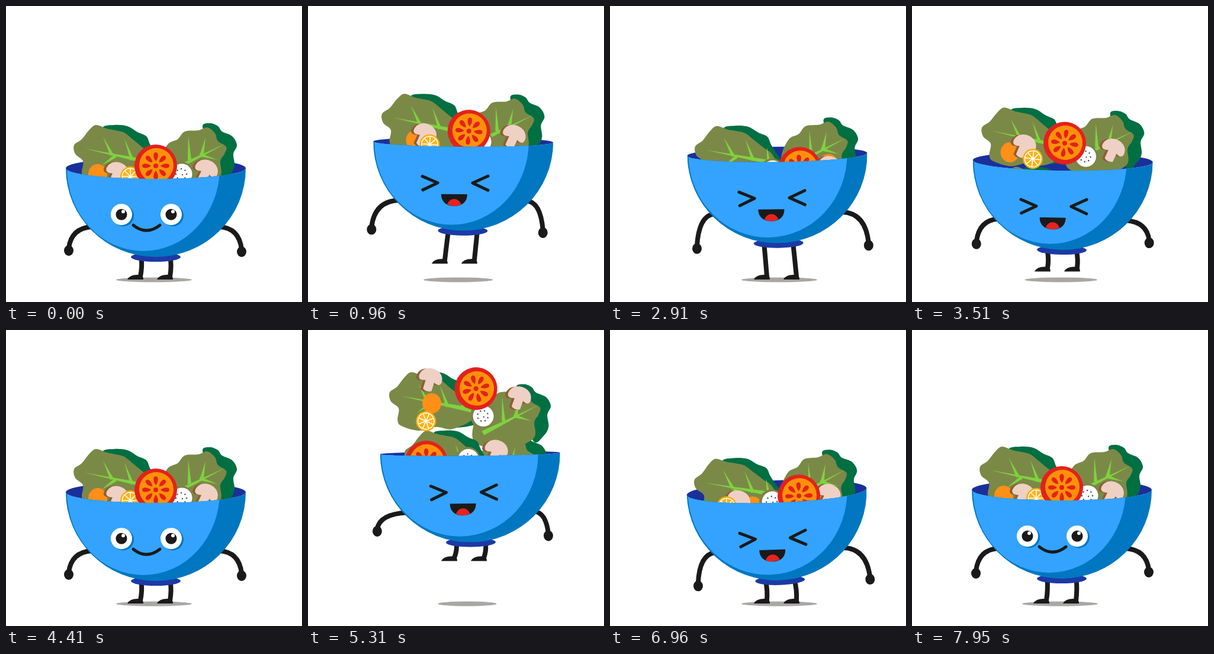
These frames come from a looping animation (500 px wide and 500 px high, 8 s). An HTML page:

```html
<!DOCTYPE html>
<html lang="en">
<head>
<meta charset="utf-8">
<title>Jumping salad bowl</title>
<style>
  html, body { margin: 0; width: 100%; height: 100%; overflow: hidden; background: #fff; }
  svg { display: block; width: 100%; height: 100%; }
  .limb { fill: none; stroke: #1a1a1a; stroke-width: 8; stroke-linecap: round; }
  .ink { fill: #1a1a1a; }
  .line { fill: none; stroke: #1a1a1a; stroke-width: 5; stroke-linecap: round; stroke-linejoin: round; }
</style>
</head>
<body>
<svg viewBox="0 0 500 500">
  <defs>
    <clipPath id="opening"><path id="openingPath"/></clipPath>
    <clipPath id="shell"><path id="shellPath"/></clipPath>
  </defs>
  <ellipse id="shadow" cy="462.5" ry="4" fill="#aaa7a3"/>
  <path id="legs" class="limb"/>
  <path id="feet" class="ink"/>
  <g id="body">
    <path id="arms" class="limb"/>
    <ellipse id="handL" class="ink" rx="8" ry="9"/>
    <ellipse id="handR" class="ink" rx="8" ry="9"/>
    <ellipse cy="150" rx="42" ry="8" fill="#1c3aa6"/>
    <ellipse id="rim" rx="152" fill="#1b2f9b"/>
    <g clip-path="url(#opening)"><g id="food"></g></g>
    <g clip-path="url(#shell)">
      <rect x="-155" y="-5" width="310" height="160" fill="#0077c0"/>
      <ellipse id="light" ry="140" fill="#33a3ff"/>
    </g>
    <g id="face">
      <g id="smile">
        <g id="eyes"></g>
        <path class="line" d="M-22 18Q0 36 23 18"/>
      </g>
      <g id="laugh">
        <path class="line" d="M-54 -11L-28 0L-53 12M57 -12L31 0L57 12"/>
        <path class="ink" d="M-22 19H22C22 33 12 39 0 39S-22 33 -22 19Z"/>
        <path fill="#e8221f" d="M-12 36Q-8 27 0 27T12 36Q0 42 -12 36Z"/>
      </g>
    </g>
  </g>
</svg>
<script>
const LOOP = 8000, CYCLE = 4100, HALF = CYCLE / 2;
const $ = id => document.getElementById(id);
const set = (id, attrs) => { for (const a in attrs) $(id).setAttribute(a, attrs[a]); };
const mix = (a, b, k) => a + (b - a) * k;
const clamp = v => Math.max(0, Math.min(1, v));

// Smooth curve through [time, value] keys.
function track(...keys) {
  const slope = i => i > 0 && i < keys.length - 1
    ? (keys[i + 1][1] - keys[i - 1][1]) / (keys[i + 1][0] - keys[i - 1][0]) : 0;
  return t => {
    if (t <= keys[0][0]) return keys[0][1];
    const i = keys.findIndex(k => k[0] > t) - 1;
    if (i < 0) return keys[keys.length - 1][1];
    const [t0, a] = keys[i], [t1, b] = keys[i + 1], d = t1 - t0, u = (t - t0) / d;
    return mix(a, b, u * u * (3 - 2 * u))
      + d * u * (1 - u) * ((1 - u) * slope(i) - u * slope(i + 1));
  };
}

// One jump, including the rest before it and the landing after it.
const rimY = track([0, 274], [155, 276], [310, 274], [560, 275], [720, 283], [810, 273], [860, 251],
  [920, 239], [1000, 222], [1120, 210], [1210, 208.5], [1320, 221], [1450, 259], [1540, 281],
  [1600, 278], [1800, 270], [2050, 274]);
const rimDepth = track([0, 18], [310, 18], [720, 21], [810, 19], [860, 13], [1000, 7], [1210, 4],
  [1400, 11], [1540, 23], [1590, 22], [1800, 18], [2050, 18]);
const travel = track([780, 0], [860, .09], [1210, .63], [1315, .81], [1460, 1]);
const lean = track([500, 0], [810, 2.2], [860, .9], [1210, -.5], [1590, -.6], [1800, 0]);
const toss = track([810, 0], [860, -.14], [930, .06], [1210, 1], [1270, 1.15], [1450, .3],
  [1540, -.03], [1640, 0]);
const trailX = track([400, 147], [780, 152], [860, 152], [1210, 158], [1500, 147]);
const trailY = track([400, 139], [780, 152], [860, 156], [1210, 130], [1600, 141], [1800, 139]);
const leadX = track([400, 145], [780, 139], [860, 138], [1210, 131], [1500, 145]);
const leadY = track([400, 141], [780, 152], [860, 157], [1210, 140], [1600, 143], [1800, 141]);
const hover = track([1430, 0], [1560, 1], [1600, 1], [1760, 0]);

// Closed smooth outline from a flat list of coordinates.
function blob(fill, ...c) {
  const n = c.length / 2, at = i => { i = (i + n) % n; return [c[2 * i], c[2 * i + 1]]; };
  let d = "M" + at(0);
  for (let i = 0; i < n; i++) {
    const [a, b, e, f] = [at(i - 1), at(i), at(i + 1), at(i + 2)];
    d += "C" + [0, 1].map(j => b[j] + (e[j] - a[j]) / 6) + " "
      + [0, 1].map(j => e[j] - (f[j] - b[j]) / 6) + " " + e;
  }
  return `<path fill="${fill}" d="${d}Z"/>`;
}
const vein = (x, y, bx, by, w) => {
  const l = Math.hypot(bx - x, by - y), nx = (y - by) / l * w, ny = (bx - x) / l * w;
  return `<path fill="#7fd23f" d="M${x} ${y}L${bx + nx} ${by + ny}L${bx - nx} ${by - ny}Z"/>`;
};
const disc = (r, fill, x = 0, y = 0) => `<circle cx="${x}" cy="${y}" r="${r}" fill="${fill}"/>`;
const ring = (n, draw) => Array.from({ length: n }, (_, i) => draw(i * 360 / n)).join("");

const OLIVE = "#7b8947", DARK = "#006f42";
const leafLeft =
  blob(DARK, -90, -68, -70, -73, -48, -71, -31, -61, -16, -54, -10, -41, -3, -29, 9, -9, 7, 16, -50, 16, -80, -40) +
  blob(OLIVE, -125, 8, -123, -12, -136, -24, -138, -39, -125, -49, -113, -64, -101, -73, -83, -67, -68, -64,
    -53, -60, -38, -48, -21, -34, -8, -24, 2, 0, -4, 12, -34, 24, -60, 20, -89, 26, -118, 18) +
  vein(-120, -33, 0, -8, 4) + vein(-89, -53, -74, -22, 3) + vein(-53, -50, -40, -14, 3) +
  vein(-17, -36, -14, -10, 3) + vein(-92, -4, -68, -21, 3);
const leafRight =
  blob(DARK, 79, -71, 92, -76, 105, -71, 112, -62, 129, -54, 137, -39, 131, -24, 133, -4, 125, 11, 107, 20, 90, -40) +
  blob(OLIVE, 9, 22, 7, -12, 20, -40, 37, -49, 49, -62, 72, -64, 87, -69, 100, -59, 105, -46, 119, -36,
    116, -24, 109, -12, 107, 16, 60, 34) +
  vein(117, -41, 22, 6, 4) + vein(55, -55, 57, -14, 3) + vein(84, -52, 78, -24, 3) + vein(104, -14, 74, -23, 3);
const tomato = disc(36, "#e3211c") + disc(29, "#ff9108", 1, -1) +
  ring(8, a => `<path fill="#e3211c" transform="rotate(${a})" d="M0 -8C5 -14 5 -23 0 -23S-5 -14 0 -8Z"/>`) +
  disc(4, "#e3211c");
const lemon = disc(17, "#ffab0a") + disc(14.5, "#fff") + disc(13, "#ffb31a") +
  ring(8, a => `<path stroke="#fff" stroke-width="1.6" transform="rotate(${a})" d="M0 0V-13"/>`);
const cucumber = disc(21, "#7f8148") + disc(17.5, "#fff", 1, 0) +
  ring(8, a => `<circle cy="-9" r="1.3" fill="#555" transform="rotate(${a})"/>`) + disc(1.2, "#555", 2, 1);
const carrot = `<ellipse rx="16" ry="17" fill="#ff8f17"/>`;
const capPath = "M-20 0C-20 -24 20 -24 20 0Q19 9 8 4V19Q0 24 -7 19V4Q-19 9 -20 0Z";
const mushroom = `<path fill="#8d5f35" d="${capPath}" transform="translate(-4 2)"/><path fill="#efd0c5" d="${capPath}"/>`;

// Place in the bowl at the left stop, in the air, and at the right stop; then turn at rest and in the air.
const food = [
  [leafLeft, [0, 0], [3, -65], [0, 14]],
  [leafRight, [0, 100], [-8, 42], [0, 100]],
  [leafRight, [0, 0], [0, -40], [0, 9]],
  [leafLeft, [20, 100], [28, 34], [20, 100]],
  [carrot, [-98, 10], [-64, -85], [-40, 24]],
  [carrot, [60, 45], [70, 25], [87, 16]],
  [mushroom, [-65, 8], [-66, -126], [-65, 14], 25, 18],
  [mushroom, [85, 4], [84, -94], [88, 9], 25, 20, 45],
  [mushroom, [30, 60], [44, -4], [30, 60], 10, 20],
  [lemon, [-43, 14], [-74, -55], [-86, 22], 0, 25],
  [cucumber, [43, 10], [22, -63], [-10, 17], 0, 20],
  [cucumber, [0, 60], [-4, 10], [0, 60]],
  [tomato, [-60, 70], [-74, 14], [-60, 70]],
  [tomato, [0, -4], [11, -109], [38, 9], 0, 30]
];
$("food").innerHTML = food.map(f => `<g>${f[0]}</g>`).join("");
$("eyes").innerHTML = [-42, 42].map(x => `<g transform="translate(${x} 0)">
  <ellipse cx="3" cy="2" rx="18" ry="18" fill="#0077c0"/><ellipse rx="18" ry="18" fill="#fff"/>
  ${disc(9.5, "#1a1a1a")}${disc(3, "#fff", 3, -5)}</g>`).join("");

function render(now) {
  const phase = now % LOOP % CYCLE, right = phase < HALF, t = phase % HALF;
  const along = v => right ? v : 1 - v;
  const y = rimY(t), depth = rimDepth(t), p = along(travel(t)), fly = toss(t);
  const baseX = mix(253, 288, p), baseY = y + 151;
  const u = clamp((t - 900) / 590), lift = 288 * u * (1 - u);
  const ankleX = mix(250, 288, along(u)), ground = 462 - lift;

  set("shadow", { cx: mix(250, 286, along(u)), rx: 64 - lift * .2 });

  let legs = "", feet = "";
  for (const side of [-1, 1]) {
    const hx = baseX + side * 24.5, ax = ankleX + side * 25 + 2;
    const knee = Math.max(0, 55 - (ground - baseY)) * .25;
    legs += `M${hx} ${baseY}Q${(hx + ax) / 2 + knee * .6} ${(baseY + ground) / 2 - 4} ${ax} ${ground - 5}`;
    feet += `M${ax - 22} ${ground}Q${ax - 18} ${ground - 8} ${ax - 5} ${ground - 8}H${ax + 2}Q${ax + 5} ${ground - 5} ${ax + 5} ${ground}Z`;
  }
  set("legs", { d: legs });
  set("feet", { d: feet });

  const turn = (right ? 1 : -1) * lean(t);
  set("body", { transform: `translate(${baseX} ${baseY}) rotate(${turn}) translate(0 -151)` });

  const trail = [trailX(t), trailY(t)], lead = [leadX(t), leadY(t)];
  const [left, rightHand] = right ? [trail, lead] : [lead, trail];
  const arm = (s, [x, hy]) => `M${s * 108} 99Q${s * x * .97} 101 ${s * x} ${hy - 4}`;
  set("arms", { d: arm(-1, left) + arm(1, rightHand) });
  set("handL", { cx: -left[0], cy: left[1] });
  set("handR", { cx: rightHand[0], cy: rightHand[1] });

  const front = `A152 ${depth} 0 0 0 152 0`;
  set("rim", { ry: depth });
  set("openingPath", { d: `M-152 -300V0${front}V-300Z` });
  set("shellPath", { d: `M-152 0${front}A152 150 0 0 1 -152 0Z` });
  const edge = mix(108, 119, p);
  set("light", { cx: (edge - 150) / 2, rx: (edge + 150) / 2 });

  food.forEach(([, l, air, r, rest = 0, spin = 0, late = 0], i) => {
    const [x, fy] = [0, 1].map(j => mix(mix(l[j], r[j], p), air[j], fly));
    const drop = right ? late * hover(t) : 0;
    $("food").children[i].setAttribute("transform",
      `translate(${x} ${fy - drop}) rotate(${mix(rest, spin, fly)})`);
  });

  const laughing = t > 600 && t < 1500;
  set("face", { transform: `translate(${mix(-16, -11, p)} ${62 + depth * .9})` });
  set("smile", { display: laughing ? "none" : "inline" });
  set("laugh", { display: laughing ? "inline" : "none" });
  const wide = t > 1500 ? 1 + .17 * clamp((1720 - t) / 130) : 1;
  set("eyes", { transform: `scale(1 ${wide})` });
}

function frame() {
  render(performance.now());
  requestAnimationFrame(frame);
}
frame();
</script>
</body>
</html>
```
